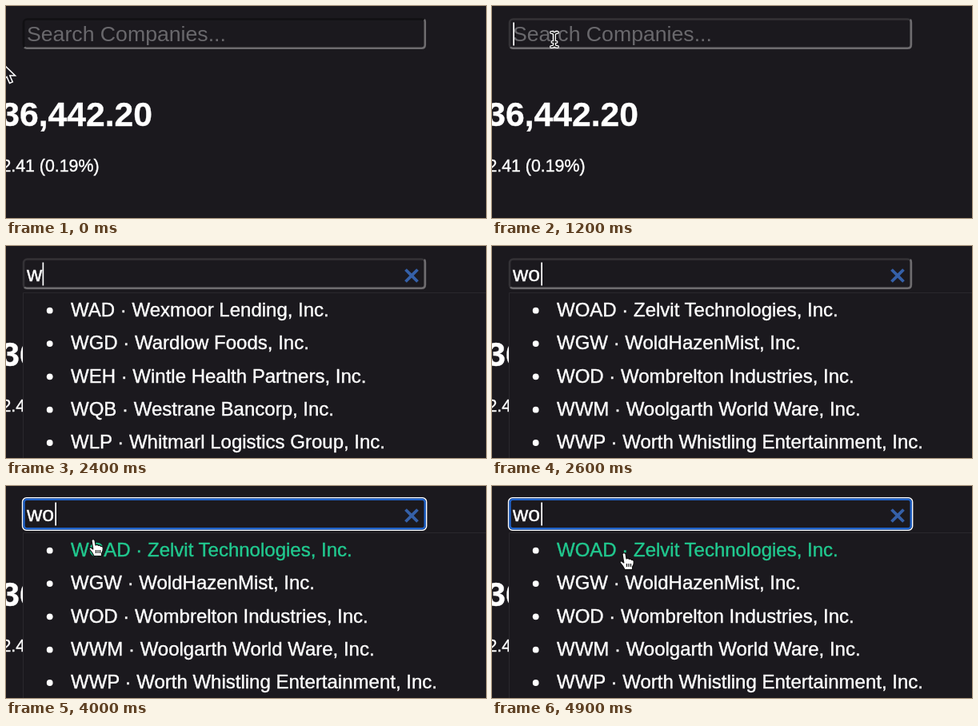
An HTML page for the animation above (5 s loop, 600 by 265 pixels).

```html
<!DOCTYPE html>
<html lang="en">
<head>
<meta charset="utf-8">
<title>Company search</title>
<style>
  html, body { margin: 0; width: 100%; height: 100%; overflow: hidden; background: #1b191e; }
  svg { display: block; width: 600px; height: 265px; font-family: "Liberation Sans", Arial, sans-serif; fill: #fff; }
  .line { fill: none; }
  text { stroke: currentColor; stroke-width: .4px; color: #fff; fill: currentColor; }
  #typed, #hint { font-size: 26.67px; }
  #hint { color: #69686c; stroke: none; }
  #list { font-size: 24px; }
  #list .hover { color: #21c98f; }
</style>
</head>
<body>
<svg viewBox="0 0 600 265">
  <text x="183" y="150" font-size="42.67" font-weight="bold" text-anchor="end">36,442.20</text>
  <text x="116.5" y="207" font-size="21.33" text-anchor="end">2.41 (0.19%)</text>

  <g id="bevel" class="line">
    <rect id="edge" x="22" y="16.5" width="502" height="36.5" rx="4.5" stroke-width="2.6"/>
    <path d="M23 51.5Q24 52.7 26 52.7H519.5q4.3 0 4.3-4.3V20q0-2-1-3" stroke="#6e6c6f" stroke-width="2.6"/>
  </g>
  <g id="ring" class="line">
    <rect x="20.6" y="14.8" width="505" height="40.4" rx="5" stroke="#fff" stroke-width="1.5"/>
    <rect x="22.5" y="16.7" width="501.2" height="36.6" rx="3.5" stroke="#1f62c9" stroke-width="2.4"/>
  </g>
  <text id="hint" x="26" y="44.2">Search Companies...</text>
  <text id="typed" x="26" y="44"></text>
  <path id="clear" class="line" d="M499.5 29.5l15 15m0-15l-15 15" stroke="#3560a8" stroke-width="3.8"/>
  <rect id="caret" y="20.5" width="1.7" height="29"/>

  <g id="list">
    <path d="M21.5 266V58.5H601" fill="#1b191e" stroke="#2a282d"/>
    <path d="M22 59H600V265H22z" fill="#1b191e"/>
    <g id="rows"></g>
  </g>

  <path id="arrow" d="M0 0V21L5 16.5L8.5 24.5L12.3 22.9L8.8 15H15.5Z" fill="#1b191e" stroke="#fff" stroke-width="1.5"/>
  <g id="beam" class="line" stroke-linecap="round">
    <path d="M-4 -9Q0 -9 0 -6Q0 -9 4 -9M0 -6V6M-4 9Q0 9 0 6Q0 9 4 9M-2.5 3H2.5" stroke="#fff" stroke-width="4"/>
    <path d="M-4 -9Q0 -9 0 -6Q0 -9 4 -9M0 -6V6M-4 9Q0 9 0 6Q0 9 4 9M-2.5 3H2.5" stroke="#111" stroke-width="1.5"/>
  </g>
  <g id="hand" stroke="#111" stroke-width="1.2" stroke-linejoin="round">
    <path d="M-2 1Q0 -1.5 2 1L3 7Q5 5.5 6.5 7.5Q8.5 6.5 9.5 8.5Q12 8 12.3 10.5Q12.5 15 10.5 17V20.5H1L-1.5 16L-5 11.5Q-4.5 8.5 -1.5 11L-.2 12Z"/>
    <path class="line" d="M3.5 13v4m2.5-4v4m2.5-4v4"/>
  </g>
</svg>
<script>
const $ = id => document.getElementById(id);
const LOOP = 5000, STEP = 100;

const first = ["WAD · Wexmoor Lending, Inc.", "WGD · Wardlow Foods, Inc.", "WEH · Wintle Health Partners, Inc.",
  "WQB · Westrane Bancorp, Inc.", "WLP · Whitmarl Logistics Group, Inc."];
const second = ["WOAD · Zelvit Technologies, Inc.", "WGW · WoldHazenMist, Inc.", "WOD · Wombrelton Industries, Inc.",
  "WWM · Woolgarth World Ware, Inc.", "WWP · Worth Whistling Entertainment, Inc."];

// time, x, y
const path = [
  [0, -4, 72], [100, 3, 72], [300, 3, 72], [400, 18, 68], [500, 48, 56], [600, 70, 47], [700, 77, 43], [800, 78, 42],
  [3400, 78, 42], [3500, 82, 42], [3600, 92, 47], [3700, 102, 52.5], [3800, 107, 59], [3900, 109, 65], [4000, 109, 67],
  [4100, 110, 68], [4600, 128, 81], [4700, 142, 84], [4800, 157, 84], [4900, 165, 84]
];

function place(t) {
  const i = path.findIndex(p => p[0] > t);
  if (i < 0) return path[path.length - 1].slice(1);
  const [a, b] = [path[i - 1], path[i]], k = (t - a[0]) / (b[0] - a[0]);
  return [1, 2].map(n => a[n] + (b[n] - a[n]) * k);
}

function pointer(t) {
  if (t >= 2300 && t < 3500) return "";
  if (t >= 3900) return "hand";
  if (t < 600 || t >= 3700) return "arrow";
  return "beam";
}

const show = (id, on) => $(id).style.display = on ? "" : "none";

$("rows").innerHTML = second.map((_, i) => {
  const y = i * 41.33;
  return `<circle cx="54.7" cy="${80.7 + y}" r="3.9"/><text x="81" y="${88 + y}"></text>`;
}).join("");
const labels = [...$("rows").querySelectorAll("text")];

function draw(now) {
  const t = Math.floor(now % LOOP / STEP) * STEP;
  const word = t < 2300 ? "" : t < 2600 ? "w" : "wo";
  const focus = t >= 3900;

  // The caret restarts its blink at the click and at each key
  const since = t < 2300 ? 1200 : t < 2600 ? 2300 : 2600;
  show("caret", t >= since && (t - since) % 1000 < 500);
  $("caret").setAttribute("x", [26.3, 45.5, 61.3][word.length]);

  $("typed").textContent = word;
  show("hint", !word);
  show("clear", word);
  show("list", t >= 2400);
  show("bevel", !focus);
  show("ring", focus);
  $("edge").setAttribute("stroke", t < 600 ? "#111013" : "#343236");

  const names = t < 2600 ? first : second;
  labels.forEach((el, i) => el.textContent = names[i]);
  labels[0].classList.toggle("hover", focus);

  const kind = pointer(t), at = place(t);
  for (const id of ["arrow", "beam", "hand"]) {
    show(id, id === kind);
    $(id).setAttribute("transform", `translate(${at})`);
  }
}

let start;
function tick(now) {
  start ??= now;
  draw(now - start);
  requestAnimationFrame(tick);
}
draw(0);
requestAnimationFrame(tick);
</script>
</body>
</html>
```
